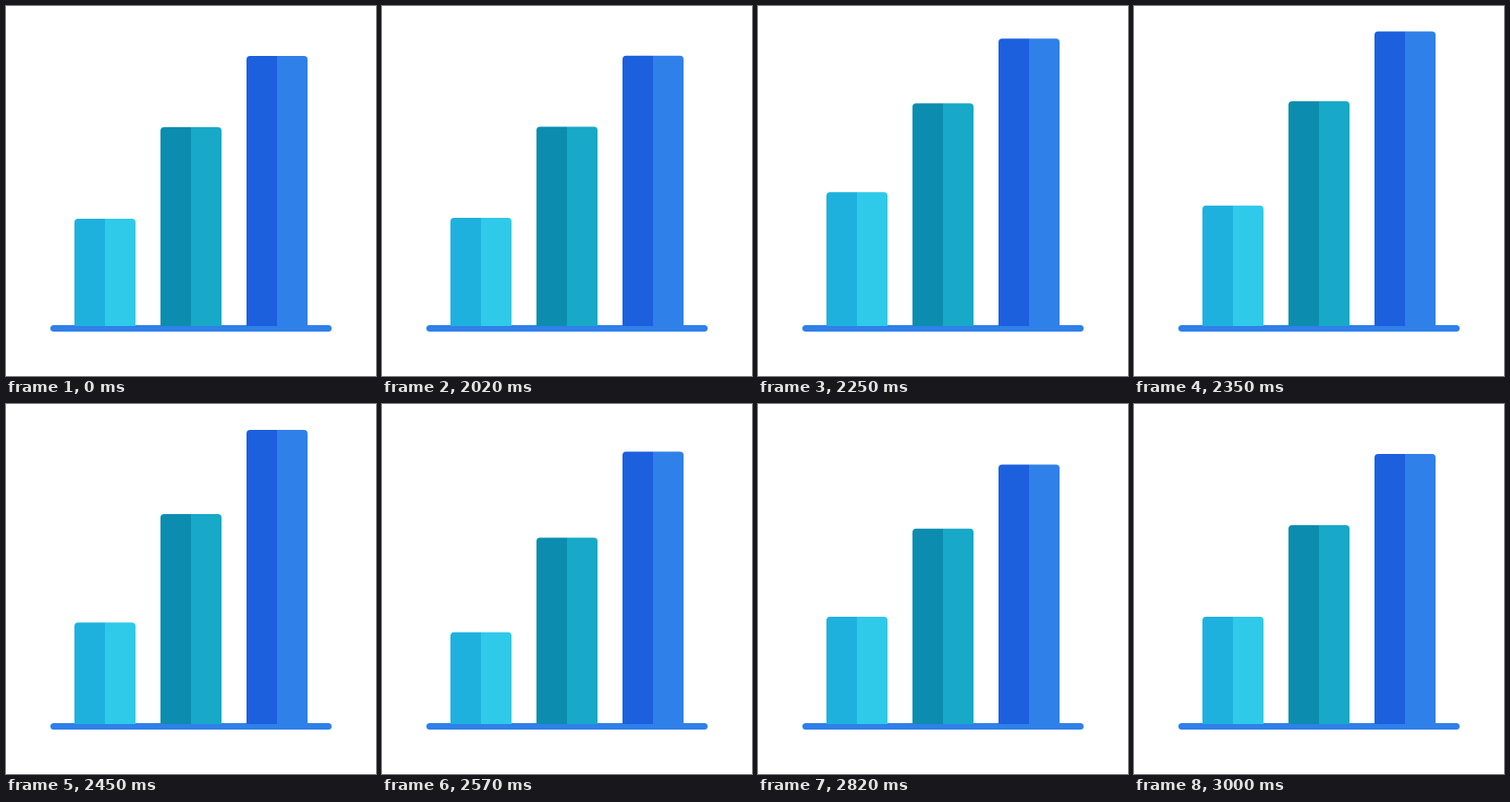
Recreate the animation shown at these times as an HTML page with a canvas. Size 400 by 400 pixels, loop 3.02 s.

```html
<!DOCTYPE html>
<html lang="en">
<head>
<meta charset="utf-8">
<title>Bar chart</title>
<style>
html, body { margin: 0; width: 100%; height: 100%; overflow: hidden; background: #fff; }
canvas { display: block; width: 400px; height: 400px; }
</style>
</head>
<body>
<canvas id="stage" width="400" height="400"></canvas>
<script>
const ctx = document.getElementById("stage").getContext("2d");
const LOOP = 3020, REST = 2000, STEP = 25;
const FLOOR = 346, WIDTH = 66, RADIUS = 4;

// keys: [ms after the rest, vertical offset]
const bars = [
  { x: 74, top: 230, left: "#1eb1de", right: "#2fc9ea",
    keys: [[0, 0], [215, -30], [560, 17], [820, 0]] },
  { x: 167, top: 131, left: "#0c8db0", right: "#17a9c7",
    keys: [[0, 0], [320, -29], [635, 17.5], [910, 0]] },
  { x: 260, top: 54, left: "#1c60de", right: "#2f80e9",
    keys: [[0, 0], [410, -28], [715, 17], [1000, 0]] }
];

const ease = u => (1 - Math.cos(Math.PI * u)) / 2;

function offset(keys, t) {
  for (let i = 1; i < keys.length; i++) {
    const [t0, a] = keys[i - 1], [t1, b] = keys[i];
    if (t < t1) return a + (b - a) * ease((t - t0) / (t1 - t0));
  }
  return 0;
}

function box(x, y, w, h, radii, color) {
  ctx.fillStyle = color;
  ctx.beginPath();
  ctx.roundRect(x, y, w, h, radii);
  ctx.fill();
}

function draw(ms) {
  // the bounce advances in 25 ms steps
  const t = Math.max(0, Math.floor((ms - REST + 6) / STEP) * STEP);
  ctx.fillStyle = "#fff";
  ctx.fillRect(0, 0, 400, 400);
  box(48, 345, 304, 7, 3.5, "#2f80e9");
  for (const b of bars) {
    const y = b.top + offset(b.keys, t), h = FLOOR - y, half = WIDTH / 2;
    box(b.x, y, half, h, [RADIUS, 0, 0, 0], b.left);
    box(b.x + half, y, half, h, [0, RADIUS, 0, 0], b.right);
  }
}

const start = performance.now();
function tick() {
  draw((performance.now() - start) % LOOP);
  requestAnimationFrame(tick);
}
tick();
</script>
</body>
</html>
```
